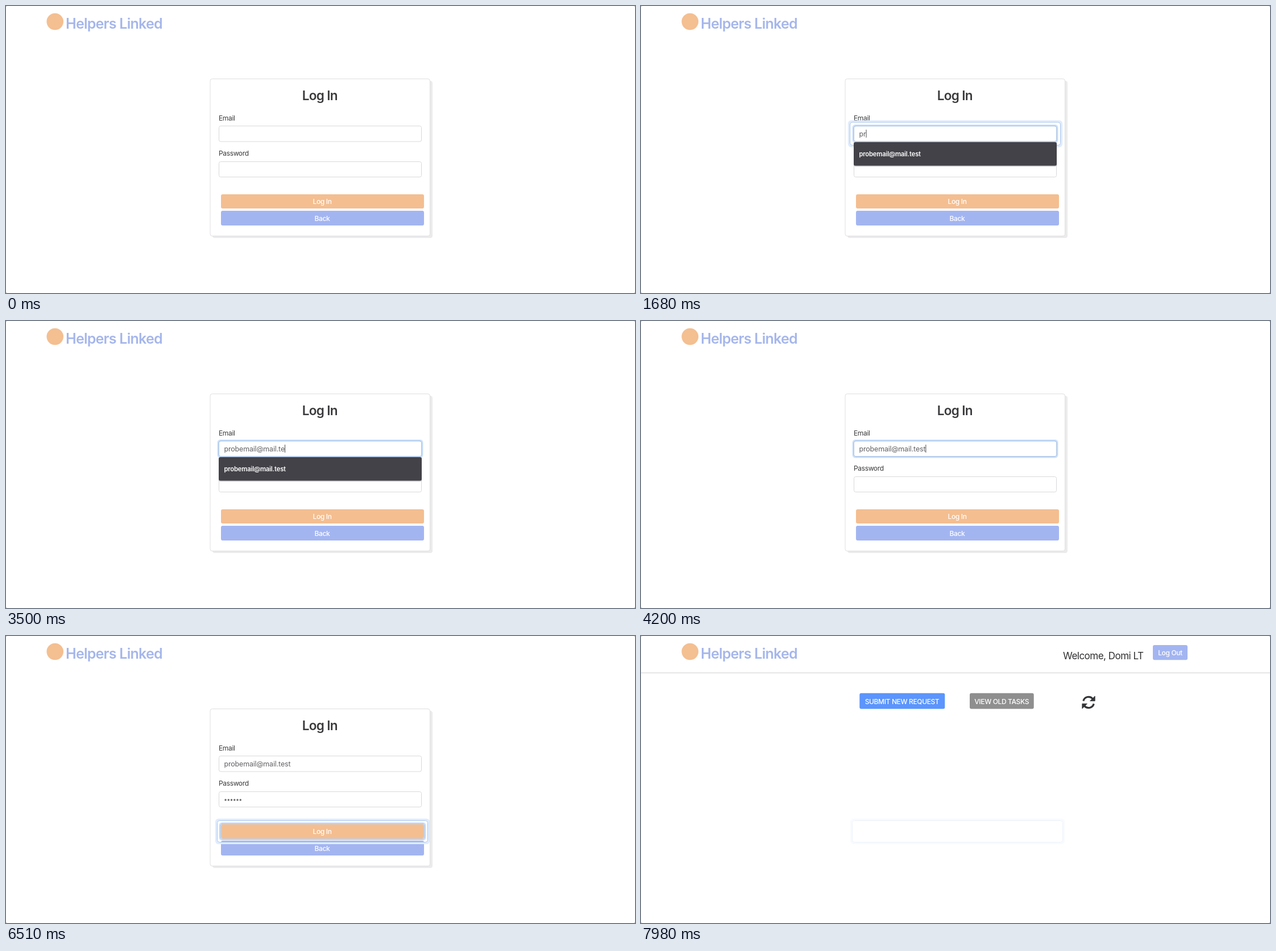
An HTML page that plays this animation: 1106x506 px, repeating every 8000 ms.

```html
<!DOCTYPE html>
<html lang="en">
<head>
<meta charset="utf-8">
<title>Log In</title>
<style>
html, body { margin: 0; width: 100%; height: 100%; overflow: hidden; background: #999; }
svg { display: block; width: 1106px; height: 506px; }
text { font: 12px Inter, "Liberation Sans", sans-serif; letter-spacing: -.03em; fill: #3a3a3c; }
.mid { text-anchor: middle; }
.brand { font-size: 25px; font-weight: 600; fill: #a5b6eb; }
.title { font-size: 22.5px; font-weight: 600; }
.button { font-weight: 500; fill: #fff; text-anchor: middle; }
.typed { font-size: 12.4px; letter-spacing: -.01em; fill: #626266; }
.welcome { font-size: 17px; fill: #2f2f31; }
.item { font-size: 11.2px; letter-spacing: -.015em; font-weight: 600; fill: #fff; }
.input { fill: #fff; stroke: #d9d9dc; }
</style>
</head>
<body>
<svg viewBox="0 0 1106 506">
  <rect width="1106" height="506" rx="2" fill="#fff"/>
  <circle cx="86.2" cy="27.5" r="14.8" fill="#f4bf91"/>
  <text class="brand" x="105" y="40">Helpers Linked</text>

  <g id="login">
    <rect x="363" y="132" width="387" height="277" rx="4" fill="#ebebec"/>
    <rect x="359" y="128.5" width="386.5" height="277" rx="3.5" fill="#fff" stroke="#dfdfe1"/>
    <text class="title mid" x="551.8" y="166">Log In</text>
    <text x="374" y="202">Email</text>
    <rect class="input" x="374.5" y="211.5" width="356" height="27.5" rx="3"/>
    <text x="374" y="264">Password</text>
    <rect class="input" x="374.5" y="274.5" width="356" height="27" rx="3"/>
    <rect x="378" y="332" width="357" height="25" rx="3" fill="#f4be90"/>
    <text class="button" x="556" y="349">Log In</text>
    <rect x="378" y="361" width="357" height="26" rx="3" fill="#a3b5f1"/>
    <text class="button" x="556" y="378.5">Back</text>
    <text class="typed" id="email" x="383.5" y="229.5"></text>
    <g id="dots" fill="#6a6a6e"></g>
  </g>

  <g id="dashboard">
    <path d="M0 65H1106" stroke="#dedede" stroke-width="1.4"/>
    <text class="welcome" x="742" y="41">Welcome, Domi LT</text>
    <rect x="900" y="16" width="61" height="26.3" rx="3" fill="#a3b5f1"/>
    <text class="button" x="930.5" y="34">Log Out</text>
    <rect x="384.3" y="100.7" width="150" height="27.8" rx="3" fill="#5b95fd"/>
    <text class="button" x="459" y="119.5">SUBMIT NEW REQUEST</text>
    <rect x="578" y="100.7" width="112.7" height="27.8" rx="3" fill="#8f8f8f"/>
    <text class="button" x="634.2" y="119.5">VIEW OLD TASKS</text>
    <g fill="#343538"><g id="arrow">
      <path d="M777.8 114.5A9.5 9.5 0 0 1 794.5 111" fill="none" stroke="#343538" stroke-width="3.2"/>
      <path d="M798.2 106V114.6H789.6Z" stroke="#343538" stroke-width=".8" stroke-linejoin="round"/>
    </g><use href="#arrow" transform="rotate(180 787 117)"/></g>
  </g>

  <g id="rings" fill="none"></g>
  <path id="caret" stroke="#4c4c50" stroke-width="1"/>
  <g id="menu"></g>
</svg>
<script>
const LOOP = 8000, STEP = 70, PAGE_CHANGE = 7490;
const EMAIL = "probemail@mail.test";
const SUGGESTIONS = ["domiutway@mail.test", "domiask@mail.test", "domiutay@mail.test",
  "domihub@mail.test", "domi.vertahelmy@mail.test", "asdf"];
const el = id => document.getElementById(id);
const series = (n, start, gap) => Array.from({ length: n }, (_, i) => start + i * gap);
const emailKeys = [1610, 1680, 1820, 1890, 2170, ...series(10, 2310, 93), ...series(4, 3360, 140)];
const passwordKeys = [4690, 4760, 4830, 4900, 5040, 5110];
const pressed = (keys, t) => keys.filter(k => k <= t).length;
const within = (t, from, to) => t >= from && t < to;
const clamp01 = v => Math.max(0, Math.min(1, v));
const show = (node, visible) => { node.style.display = visible ? "" : "none"; };

// Focusable boxes: inner ring offset, focus start, blur, and the end of the wide outer ring.
const fields = [
  { x: 374, y: 211.5, w: 357, h: 27.5, inset: 0, from: 1260, to: 4410, outerEnd: 2590 },
  { x: 374, y: 274.5, w: 357, h: 27, inset: 0, from: 4410, to: 5950, outerEnd: 5950 },
  { x: 378, y: 332, w: 357, h: 25, inset: 1, from: 5950, to: PAGE_CHANGE, outerEnd: LOOP }
];

function ringRect({ x, y, w, h }, pad, color, width) {
  return `<rect x="${x - pad}" y="${y - pad}" width="${w + 2 * pad}" height="${h + 2 * pad}"
    rx="4" stroke="${color}" stroke-width="${width}"/>`;
}
el("rings").innerHTML = fields.map(f =>
  `<g>${ringRect(f, f.inset + 1.2, "#cfe2fa", 2.6)}${ringRect(f, f.inset, "#a9c6ea", 1.3)}</g>
   <g>${ringRect(f, 8.3, "#e0ecfc", 3.6)}${ringRect(f, 6.5, "#aac6ee", 1)}</g>`).join("");
const ringGroups = [...el("rings").children];

el("dots").innerHTML = series(6, 386, 5.25)
  .map(x => `<circle cx="${x}" cy="289" r="1.7"/>`).join("");

function menuMarkup(items) {
  const height = 42 + (items.length - 1) * 29.4;
  return `<rect x="374" y="241" width="357" height="${height}" rx="3" fill="#0003"/>
    <rect x="374" y="240" width="357" height="${height - .5}" rx="3" fill="#434248"/>` +
    items.map((s, i) => `<text class="item" x="383.5" y="${265.3 + i * 29.3}">${s}</text>`).join("");
}

function draw(t) {
  const onLogin = t < PAGE_CHANGE;
  show(el("login"), onLogin);
  show(el("dashboard"), !onLogin);

  const count = pressed(emailKeys, t);
  el("email").textContent = EMAIL.slice(0, count);
  const dotCount = pressed(passwordKeys, t);
  [...el("dots").children].forEach((dot, i) => show(dot, i < dotCount));

  fields.forEach((f, i) => {
    const fadeIn = clamp01((t - f.from) / 150);
    const fadeOut = clamp01(1 - (t - f.to) / 150);
    const leftover = onLogin ? 1 : .22;
    ringGroups[2 * i].style.opacity = onLogin ? fadeIn * fadeOut : 0;
    ringGroups[2 * i + 1].style.opacity = t < f.outerEnd ? fadeIn * leftover : 0;
  });

  const inEmail = within(t, 1260, 4410);
  show(el("caret"), inEmail || within(t, 4410, 5670));
  const caretX = inEmail
    ? 384 + (count ? el("email").getComputedTextLength() : 0)
    : 384 + dotCount * 5.3;
  el("caret").setAttribute("d", `M${caretX} ${inEmail ? 218 : 281}v14`);

  const menuOpen = within(t, 1330, 4060);
  el("menu").innerHTML = menuOpen ? menuMarkup(count ? [EMAIL] : SUGGESTIONS) : "";
}

const start = performance.now();
let last = -1;
function frame() {
  const t = Math.floor((performance.now() - start) % LOOP / STEP) * STEP;
  if (t !== last) draw(last = t);
  requestAnimationFrame(frame);
}
frame();
</script>
</body>
</html>
```
